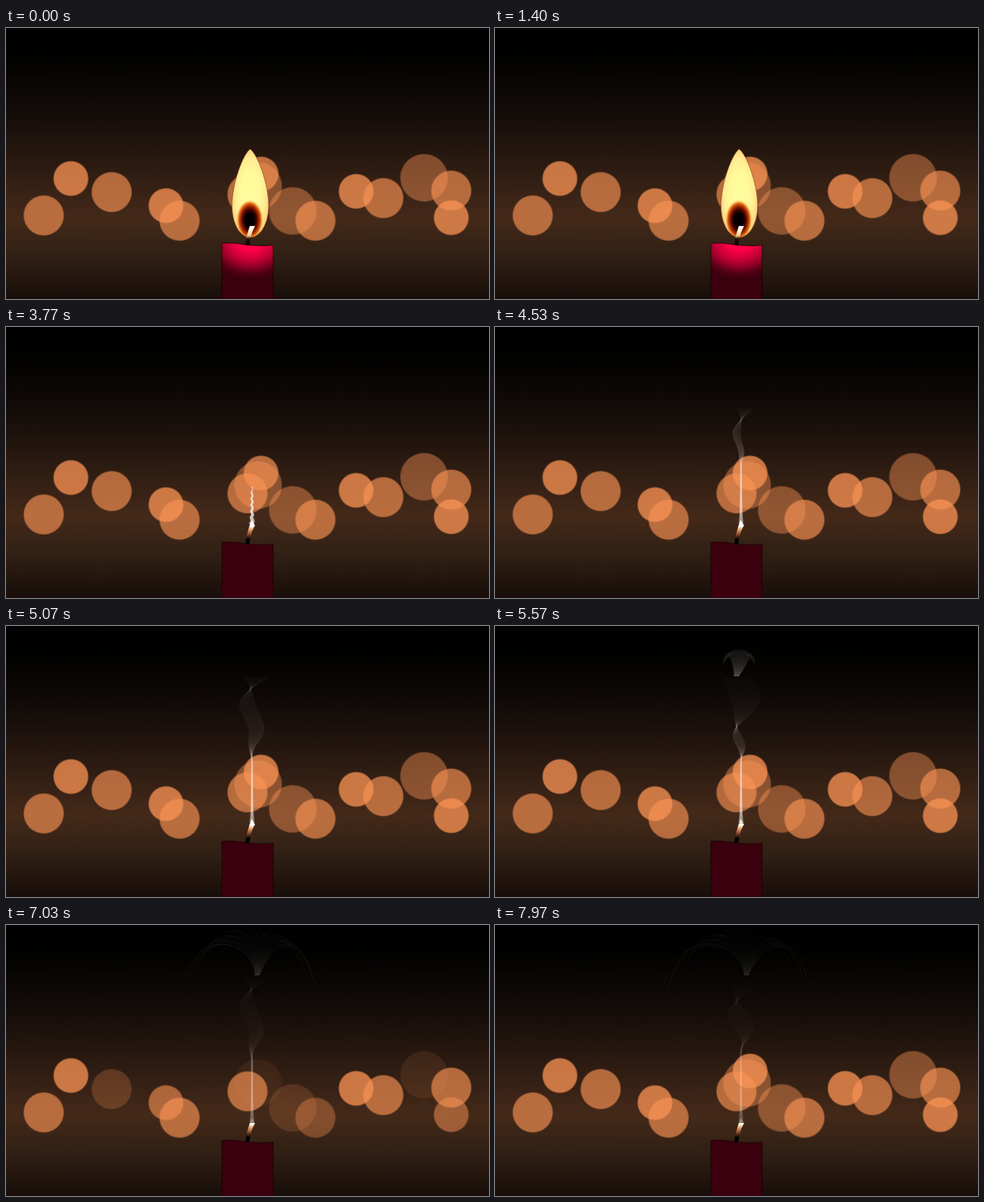
These frames come from a looping animation (640x360 px, 8 s). An HTML page with a canvas:

```html
<!DOCTYPE html>
<html lang="en">
<head>
<meta charset="utf-8">
<title>Candle</title>
<style>
  html, body { margin: 0; width: 100%; height: 100%; overflow: hidden; background: #000; }
  canvas { display: block; width: 640px; height: 360px; }
</style>
</head>
<body>
<canvas id="stage" width="640" height="360"></canvas>
<script>
const ctx = document.getElementById('stage').getContext('2d');
const LOOP = 8000, BLOW = 3510, GLOW_PERIOD = 3780;

// Bokeh lights: x, y, radius, time of the darkest moment
const lights = [
  [334, 210, 32, 3080], [380, 243, 32, 2950], [554, 199, 32, 3030],
  [50, 249, 27, 2600], [140, 218, 27, 2970], [230, 256, 27, 2460],
  [320, 221, 27, 2430], [410, 256, 27, 2880], [500, 226, 27, 2380],
  [590, 216, 27, 2460], [86, 200, 23.5, 2530], [212, 236, 23.5, 2760],
  [338, 194, 23.5, 3200], [464, 217, 23.5, 2530], [590, 252, 23.5, 2820]
];

const clamp = (v, lo = 0, hi = 1) => Math.min(hi, Math.max(lo, v));
const smooth = v => { v = clamp(v); return v * v * (3 - 2 * v); };

function addStops(gradient, stops) {
  for (const [at, color] of stops) gradient.addColorStop(at, color);
  return gradient;
}
const vertical = (y0, y1, stops) => addStops(ctx.createLinearGradient(0, y0, 0, y1), stops);
const radial = (r, stops) => addStops(ctx.createRadialGradient(0, 0, 0, 0, 0, r), stops);

// Fill a clipped path with a radial gradient squeezed into an ellipse
function glow(path, x, y, rx, ry, stops) {
  ctx.save();
  ctx.clip(path);
  ctx.translate(x, y);
  ctx.scale(rx / ry, 1);
  ctx.fillStyle = radial(ry, stops);
  ctx.fillRect(-400, -400, 800, 800);
  ctx.restore();
}

const candle = new Path2D('M286 360V286Q301 285 311 287T333 289Q345 290 354 288V360Z');
const flame = new Path2D('M323.500 161C333 167 348 207 348 236C348 260 337 278 323.500 278C310 278 299.500 260 299.500 236C299.500 207 314 167 323.500 161Z');
const wick = new Path2D('M323 263H330Q326 270 324 279L322.500 288H317L318.500 278Z');

function drawBackground() {
  ctx.fillStyle = vertical(0, 360, [
    [0, '#000'], [.1, '#010100'], [.28, '#100a08'], [.38, '#1b110c'],
    [.7, '#442919'], [.84, '#302014'], [1, '#180d09']
  ]);
  ctx.fillRect(0, 0, 640, 360);
}

function drawLights(t) {
  for (const [x, y, r, dark] of lights) {
    let d = (t - dark) % GLOW_PERIOD;
    if (d < -GLOW_PERIOD / 2) d += GLOW_PERIOD;
    if (d > GLOW_PERIOD / 2) d -= GLOW_PERIOD;
    const full = r > 30 ? .43 : r > 25 ? .65 : .76;
    ctx.save();
    ctx.globalAlpha = full * smooth(Math.abs(d) / 700);
    ctx.translate(x, y);
    ctx.fillStyle = radial(r + .5, [[0, '#fa9354'], [1 - 2 / r, '#fa9354'], [1, 'rgba(250,147,84,0)']]);
    ctx.beginPath();
    ctx.arc(0, 0, r + .5, 0, 7);
    ctx.fill();
    ctx.restore();
  }
}

function drawCandle(lit) {
  ctx.fillStyle = '#3b000e';
  ctx.fill(candle);
  if (lit > 0) {
    ctx.globalAlpha = lit;
    glow(candle, 324, 283, 62, 50, [
      [0, '#ff0047'], [.25, '#ff0046'], [.55, '#bd0034'], [.85, '#560016'], [1, '#3b000e']
    ]);
    ctx.globalAlpha = 1;
  }
  ctx.strokeStyle = 'rgba(20,4,5,.8)';
  ctx.lineWidth = 1;
  ctx.stroke(candle);
}

function drawFlame(lit) {
  if (lit <= 0) return;
  ctx.globalAlpha = lit;
  glow(flame, 323.5, 220, 31, 72, [
    [0, '#fffda0'], [.4, '#fffa9b'], [.65, '#ffeb92'], [.85, '#f9cf80'], [1, '#e8a85f']
  ]);
  glow(flame, 323, 255, 18, 27, [
    [0, '#000'], [.34, '#080000'], [.52, '#4a0500'], [.7, '#a82c00'],
    [.84, '#ed7b20'], [1, 'rgba(255,225,125,0)']
  ]);
  ctx.strokeStyle = 'rgba(140,68,25,.65)';
  ctx.lineWidth = 1;
  ctx.stroke(flame);
  ctx.globalAlpha = 1;
}

function drawWick(lit) {
  ctx.fillStyle = vertical(263, 288, lit > .5
    ? [[0, '#fff'], [.3, '#ffefc0'], [.52, '#efc98a'], [.68, '#2a0d06'], [1, '#080202']]
    : [[0, '#fff'], [.1, '#ffe5c4'], [.3, '#d58b52'], [.55, '#6a3b20'], [.75, '#080403'], [1, '#000']]);
  ctx.fill(wick);
}

// Sideways position of one smoke strand (u from -1 to 1) at height h
function strandX(h, u, age) {
  const rise = .08 * (age - 2040);
  const phase = (h - 120 - rise) * Math.PI / 40;
  const sway = -7 * smooth((h - 80) / 45) * Math.cos(phase + u * .5);
  const twist = Math.sin((h - 132 - rise) * Math.PI / 80);
  const stem = 1 + 2.2 * Math.exp(-h / 12);
  const jitter = clamp(1 - age / 700) * 1.3 * Math.sin(h * .75 + age / 60);
  return 326 + sway + jitter + u * (stem + .23 * Math.max(0, h - 80) * twist);
}

function drawSmoke(age) {
  if (age <= 0) return;
  const rise = Math.min(258, 300 * (1 - Math.exp(-age / 1400)));
  const spread = Math.max(0, 20 + 90 * (1 - Math.exp((2040 - age) / 1050)));
  const top = Math.min(rise - Math.min(20, spread), 195);
  const strength = age < 2040 ? 1 : .25 + .75 * Math.exp((2040 - age) / 1150);
  const young = 1 + clamp(1 - age / 900);
  const shade = a => `rgba(235,230,225,${a * strength})`;

  ctx.strokeStyle = vertical(262, 262 - top, [
    [0, `rgba(255,252,246,${Math.min(.5, .25 * strength * young)})`],
    [Math.min(.8, 70 / top), shade(.17 * young)],
    [Math.min(.9, 105 / top), shade(.095)],
    [1, shade(age < 700 ? .14 : .045)]
  ]);
  ctx.lineWidth = .8;
  for (let i = 0; i < 17; i++) {
    const u = i / 8 - 1;
    ctx.beginPath();
    for (let h = 0; h <= top; h += 2) ctx.lineTo(strandX(h, u, age), 262 - h);
    ctx.stroke();
  }

  // Mushroom of thin threads that opens at the top
  if (spread > 0) {
    const x = strandX(top, 0, age), y = 262 - top;
    const roof = 262 - rise, drop = spread * 1.05;
    ctx.strokeStyle = `rgba(190,185,180,${.1 * strength * Math.min(1, spread / 20)})`;
    ctx.lineWidth = 1;
    for (let i = 0; i < 37; i++) {
      const u = i / 18 - 1, fold = Math.sin(i * 2.4 + age / 900);
      ctx.beginPath();
      ctx.moveTo(x + u * 3, y);
      ctx.bezierCurveTo(
        x + 8 + u * 12, y - (y - roof) * .7,
        323 + spread * u * .8, roof - 4 + fold * 3,
        323 + spread * u, roof + 3 + drop * u * u * .8 + fold * spread * .06);
      ctx.stroke();
    }
  }
}

function drawEmber(age) {
  if (age <= 0) return;
  ctx.fillStyle = `rgba(255,255,255,${clamp(1.5 - age / 3000, .35)})`;
  ctx.beginPath();
  ctx.moveTo(325.5, 256);
  ctx.quadraticCurveTo(328, 261, 330, 264);
  ctx.quadraticCurveTo(326, 267, 322.5, 265);
  ctx.fill();
}

function frame(now) {
  const t = now % LOOP, age = t - BLOW;
  const lit = clamp(1 - age / 110);
  drawBackground();
  drawLights(t);
  drawCandle(lit);
  drawFlame(lit);
  drawWick(lit);
  drawSmoke(age);
  drawEmber(age);
  requestAnimationFrame(frame);
}
requestAnimationFrame(frame);
</script>
</body>
</html>
```
